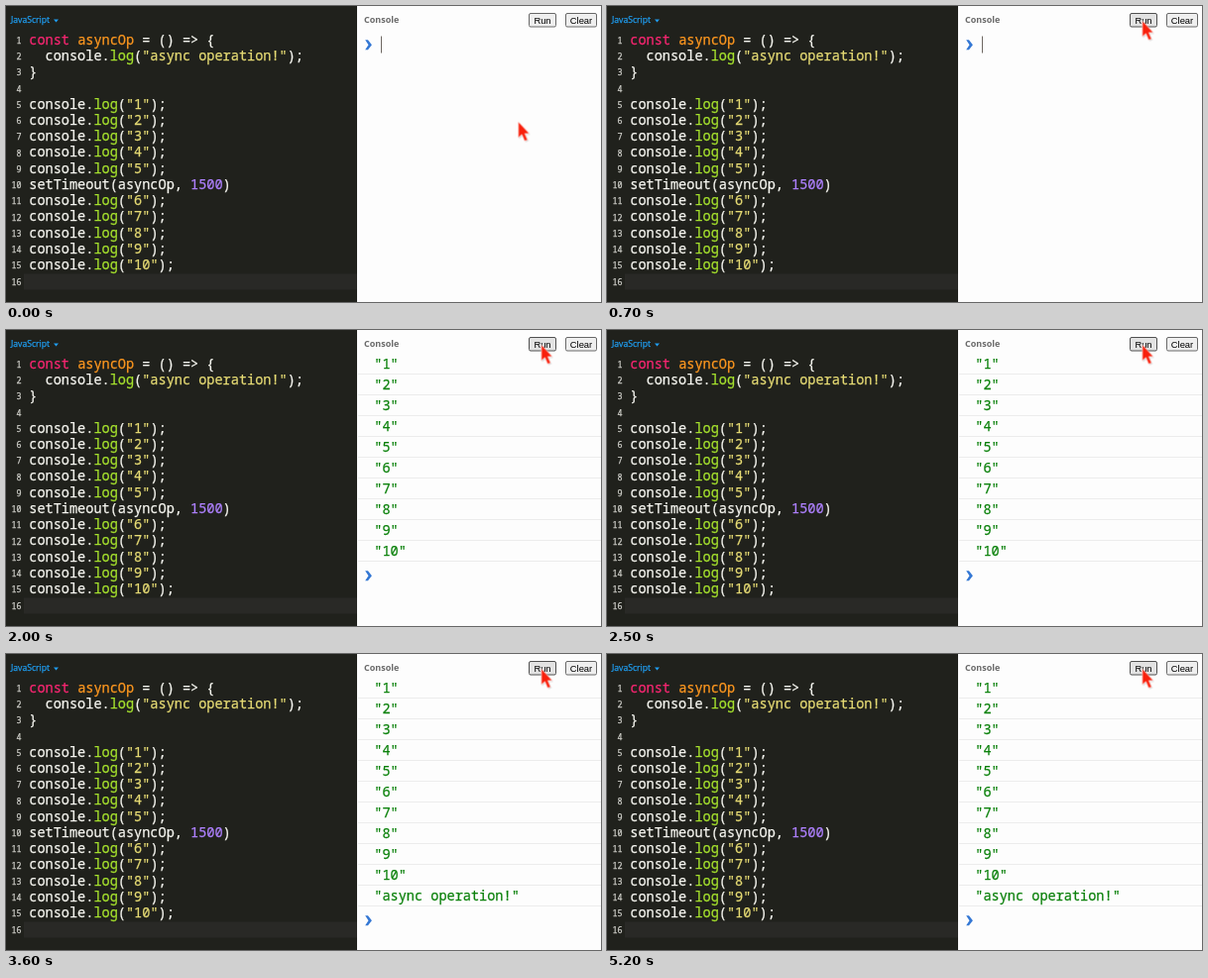
An HTML page for the animation above (5.3 s loop, 600 px wide and 299 px high).

```html
<!DOCTYPE html>
<html lang="en">
<head>
<meta charset="utf-8">
<title>Async console</title>
<style>
  html, body { margin: 0; width: 100%; height: 100%; overflow: hidden; background: #fdfdfd; }
  svg { display: block; width: 600px; height: 299px; }
  text { white-space: pre; }
  .mono { font: 13.57px "Noto Sans Mono", monospace; }
  .mono, .mono tspan, .num, .label { fill: currentColor; stroke: currentColor; stroke-width: .25px; }
  .code { color: #f8f8f2; }
  .num { font: 8.4px "Noto Sans Mono", monospace; color: #d2d2cc; text-anchor: end; }
  .key { color: #f92672; }
  .def { color: #fd971f; }
  .fn { color: #a6e22e; }
  .str { color: #e6db74; }
  .lit { color: #ae81ff; }
  .out { color: #0a800a; }
  .rule { stroke: #ececec; }
  .label { font: 8.6px "Open Sans", sans-serif; color: #1f9df0; }
  .title { font: bold 9px "Open Sans", sans-serif; fill: #6a6a6a; }
  .button rect { fill: #efefef; stroke: #686868; }
  .button text { font: 9.4px "Liberation Sans", Arial, sans-serif; text-anchor: middle; }

  /* every animation spans one 5.3 s loop */
  .pointer, .run rect, .caret, .logs, .late, .prompt {
    animation: 5300ms step-end infinite;
  }
  .pointer { animation-name: move; }
  .run rect { animation-name: hover; }
  .caret { animation-name: blur; }
  .logs { animation-name: print; }
  .late { animation-name: timeout; }
  .prompt { animation-name: push; }

  @keyframes move {
    0% { transform: translate(516.5px, 116.7px); }
    1.886% { transform: translate(518px, 110px); }
    3.773% { transform: translate(522px, 92px); }
    5.66% { transform: translate(528px, 66px); }
    7.547% { transform: translate(534px, 40px); }
    9.433% { transform: translate(538px, 22px); }
    11.32%, 100% { transform: translate(539.7px, 14.7px); }
  }
  @keyframes hover {
    0% { fill: #efefef; stroke: #686868; }
    11.32%, 100% { fill: #e2e2e2; stroke: #4f4f4f; }
  }
  @keyframes blur {
    0% { opacity: 1; }
    16.981%, 100% { opacity: 0; }
  }
  @keyframes print {
    0% { opacity: 0; }
    24.528%, 100% { opacity: 1; }
  }
  @keyframes timeout {
    0% { opacity: 0; }
    52.83%, 100% { opacity: 1; }
  }
  @keyframes push {
    0% { transform: translateY(0); }
    24.528% { transform: translateY(209px); }
    52.83%, 100% { transform: translateY(230px); }
  }
</style>
</head>
<body>
<svg viewBox="0 0 600 299">
  <rect width="354" height="299" fill="#20211c"/>
  <rect x="18" y="270.5" width="336" height="16" fill="#292926"/>
  <text class="label" x="5" y="17">JavaScript</text>
  <path d="M48 13.5h5l-2.5 3z" fill="#1f9df0"/>
  <g id="editor"></g>

  <g class="logs" id="logs"></g>
  <g class="late" id="late"></g>
  <text class="title" x="361" y="17">Console</text>
  <g class="button run">
    <rect x="527.5" y="7.5" width="27" height="13.5" rx="1.5"/>
    <text x="541" y="17.6">Run</text>
  </g>
  <g class="button">
    <rect x="564.5" y="7.5" width="31" height="13.5" rx="1.5"/>
    <text x="580" y="17.6">Clear</text>
  </g>
  <path class="prompt" d="M362.2 34.2h2.8l3.9 5-3.9 5h-2.8l3.3-5z" fill="#3377d4"/>
  <rect class="caret" x="378" y="30.5" width="1" height="17" fill="#6e6862"/>

  <g class="pointer">
    <g transform="scale(1.08)">
      <path d="M1 1V16.3L4.4 13.2 7 19.3 9.8 18.1 7.2 12.3H11.3Z" fill="#000" opacity=".14"/>
      <path d="M0 0V15.3L3.4 12.2 6 18.3 8.8 17.1 6.2 11.3H10.5Z" fill="#f8200c" stroke="#fff" stroke-width=".6"/>
    </g>
  </g>
</svg>
<script>
  const byId = id => document.getElementById(id);
  const span = (cls, s) => `<tspan class="${cls}">${s}</tspan>`;
  const text = (cls, x, y, s) => `<text class="${cls}" x="${x}" y="${y}">${s}</text>`;
  const log = s => `console.${span("fn", "log")}(${span("str", `"${s}"`)});`;
  const range = (from, to) => Array.from({ length: to - from + 1 }, (_, i) => from + i);

  const code = [
    `${span("key", "const")} ${span("def", "asyncOp")} = () =&gt; {`,
    "  " + log("async operation!"),
    "}",
    "",
    ...range(1, 5).map(log),
    `setTimeout(asyncOp, ${span("lit", "1500")})`,
    ...range(6, 10).map(log),
    ""
  ];
  byId("editor").innerHTML = code.map((line, i) => {
    const y = 38.5 + i * 16.25;
    return text("num", 15.5, y - 0.6, i + 1) + text("mono code", 23.3, y, line);
  }).join("");

  const row = (s, i) => {
    const y = 39 + i * 21;
    return text("mono out", 371.3, y, `"${s}"`) +
      `<path class="rule" d="M355 ${y + 5.5}H600"/>`;
  };
  byId("logs").innerHTML = range(1, 10).map(row).join("");
  byId("late").innerHTML = row("async operation!", 10);
</script>
</body>
</html>
```
